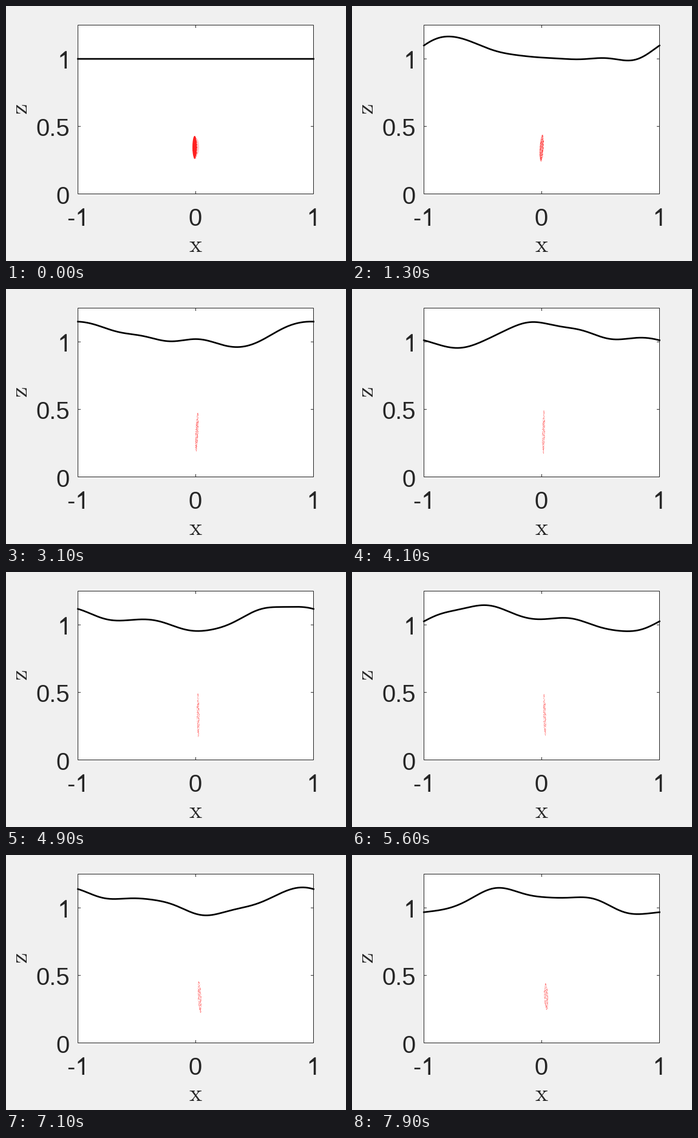
Animation of 560 by 420 pixels, one loop 8000 ms. Source, as a matplotlib script:

```python
import numpy as np
import matplotlib.pyplot as plt
from matplotlib.animation import FuncAnimation
from matplotlib.patches import Ellipse, Polygon, Rectangle

W, H, DPI = 560, 420, 100
FRAMES, STEP = 80, 100
LEFT, RIGHT, TOP, BOTTOM = 118.5, 506.5, 31.5, 309.5
MID = (LEFT + RIGHT) / 2
UNIT = (BOTTOM - TOP) / 1.25
REST = BOTTOM - UNIT
PX = 72 / DPI
EM = 40
INK = "#262626"

plt.rcParams["mathtext.fontset"] = "cm"
plt.rcParams["font.family"] = "Liberation Sans"

fig = plt.figure(figsize=(W / DPI, H / DPI), dpi=DPI, facecolor="#f0f0f0")
ax = fig.add_axes([0, 0, 1, 1])
ax.set_xlim(0, W)
ax.set_ylim(H, 0)
ax.axis("off")


def label(x, y, text, ha="center", **kw):
    ax.text(x, y, text, ha=ha, va="baseline", fontsize=EM * PX, color=INK,
            rotation_mode="anchor", **kw)


def one(x, y):
    """Digit one without a foot; x is the right edge of its stem."""
    outline = [(0, 0), (-.088, 0), (-.088, .56), (-.264, .454),
               (-.264, .539), (-.057, .719), (0, .719)]
    ax.add_patch(Polygon(np.array(outline) * [EM, -EM] + [x, y], fc=INK, lw=0))


def tick(x, y, dx, dy):
    ax.plot([x, x + dx], [y, y + dy], color=INK, lw=PX, zorder=2, snap=False)


# Plot box, ticks and labels
ax.add_patch(Rectangle((LEFT, TOP), RIGHT - LEFT, BOTTOM - TOP, fc="white",
                       ec=INK, lw=PX, zorder=1, snap=False))
for y in (REST, REST + UNIT / 2):
    tick(LEFT, y, 4, 0)
    tick(RIGHT, y, -4, 0)
tick(MID, BOTTOM, 0, -4)
tick(MID, TOP, 0, 4)

one(100, 103)
label(105, 214, "0.5", "right")
label(105, 326, "0", "right")
label(107, 362, "-")
one(129, 362)
label(MID - .5, 362, "0")
one(510.3, 362)
label(MID, 405, r"$\mathrm{x}$")
label(35, 170, r"$\mathrm{z}$", rotation=90)

# Moving parts
theta = np.linspace(0, 2 * np.pi, 389)
xs = np.linspace(LEFT, RIGHT, theta.size)
surface, = ax.plot([], [], color="black", lw=2.67 * PX, zorder=5, snap=False,
                   solid_capstyle="projecting", solid_joinstyle="round")

rng = np.random.default_rng(4)
radius, turn = np.sqrt(rng.random(300)), 2 * np.pi * rng.random(300)
cloud = np.column_stack([radius * np.cos(turn), radius * np.sin(turn)])
rim = np.column_stack([np.cos(theta), np.sin(theta)])
dots = ax.scatter(*cloud.T, s=(.9 * PX) ** 2, c="#ff2020", linewidths=0, zorder=4)
blob = ax.add_patch(Polygon(rim, fc="#ff2020", lw=0, zorder=3))
haze = ax.add_patch(Ellipse((313.5, 232), 9, 28, fc="red", alpha=.2, lw=0, zorder=2))

# Water waves over a shallow bed: short waves lag behind long ones
mode = np.arange(1, 6)
speed = 3.17 * mode * np.sqrt(np.tanh(.32 * mode) / (.32 * mode))
size = 17.1 * .41 ** (mode - 1)


def height(t):
    """Dispersing hump in pixels: free modes plus bound harmonics."""
    phase = np.pi * mode + speed * t
    p1, p2 = phase[:2]
    free = size @ np.cos(np.outer(mode, theta) - phase[:, None])
    bound = (np.cos(2 * theta - 2 * p1) + np.cos(3 * theta - p1 - p2)
             - np.cos(theta - p2 + p1))
    return 10.85 + free + .85 * bound


def place(unit, t):
    """Stretch, shear and drift unit-disc points, keeping their area."""
    tall = 18.5 + 17.5 * np.sin(np.pi * t / 9.2) ** 2
    lean = 1.6 * np.sin(2 * np.pi * t / 9)
    u, v = unit.T
    x = 310.6 + 1.1 * t + 65 / tall * u + lean * v
    y = 232.5 + 2.5 * np.sin(np.pi * t / 8) - tall * v
    return np.column_stack([x, y])


def update(i):
    t = i * STEP / 1000
    surface.set_data(xs, REST - (height(t) if i else 0 * theta))
    dots.set_offsets(place(cloud, t))
    dots.set_alpha(.2 + .3 * np.exp(-t / 1.3))
    blob.set_xy(place(rim, t))
    blob.set_alpha(np.exp(-t / 1.2))
    haze.set_visible(i == 0)
    return surface, dots, blob, haze


anim = FuncAnimation(fig, update, frames=FRAMES, interval=STEP,
                     repeat=True, repeat_delay=0, blit=False)
plt.show()
```
